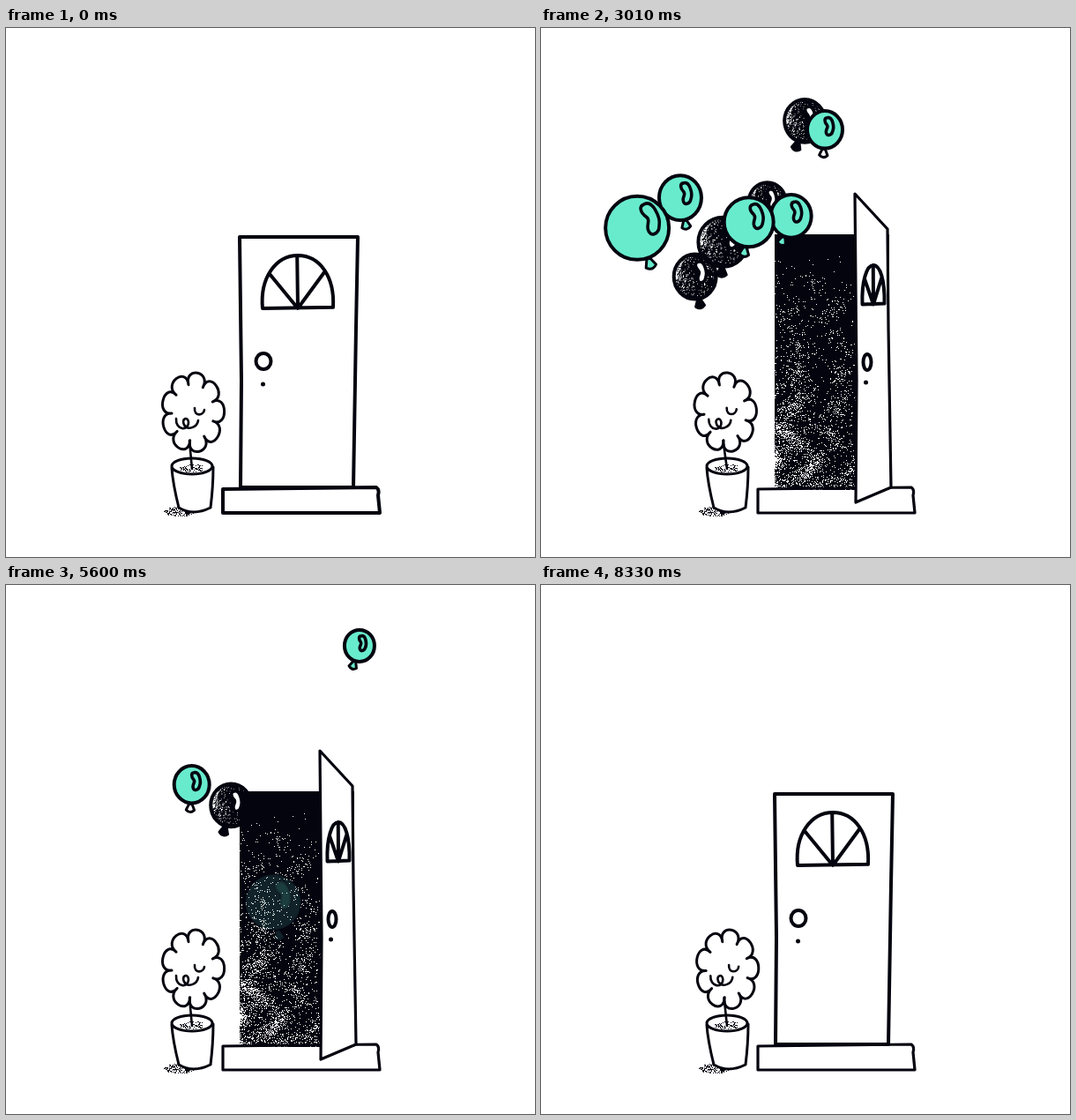
An HTML page with a canvas that plays this animation: 600 by 600 pixels, repeating every 8400 ms.

```html
<!DOCTYPE html>
<html lang="en">
<head>
<meta charset="utf-8">
<title>Balloons at the door</title>
<style>
html, body { margin: 0; height: 100%; overflow: hidden; background: #fff; }
canvas { display: block; }
</style>
</head>
<body>
<canvas id="stage" width="600" height="600"></canvas>
<script>
const LOOP = 8400, STEP = 70;
const INK = '#04040f', TEAL = '#68ebcd', WHITE = '#fff';
const c = document.getElementById('stage').getContext('2d');

let seed = 7;
const rnd = () => (seed = seed * 16807 % 2147483647) / 2147483647;
const clamp = v => Math.max(0, Math.min(1, v));
const mix = (a, b, k) => a + (b - a) * k;
const easeQuad = s => s < .5 ? 2 * s * s : 1 - 2 * (1 - s) ** 2;
const easeCos = s => (1 - Math.cos(Math.PI * clamp(s))) / 2;

// Ink surface with clumps of random pinholes; hole(u, v) is the chance of one
function speckled(w, h, hole) {
  const cv = document.createElement('canvas');
  cv.width = w;
  cv.height = h;
  const g = cv.getContext('2d');
  g.fillStyle = INK;
  g.fillRect(0, 0, w, h);
  for (let y = 0; y < h; y++) for (let x = 0; x < w; x++) {
    const clump = .5 + .5 * Math.sin(x * .13 + 2 * Math.sin(y * .07)) * Math.sin(y * .09);
    if (rnd() < hole(x / w, y / h) * (.3 + 2 * clump * clump)) g.clearRect(x, y, 1, 1);
  }
  return cv;
}
const hall = speckled(130, 290, (u, v) =>
  .05 * clamp(v * 4 - .3) + .3 * Math.exp(-u * 3.5) * clamp((v - .4) * 2.5) + .14 * clamp((v - .85) * 6));
const rubber = speckled(60, 60, (u, v) => .06 + .65 * clamp(.7 - u * 1.4));

const cloud = (n, x, y, rx, ry) => Array.from({ length: n }, () => {
  const a = rnd() * 6.283, d = Math.sqrt(rnd());
  return [x + Math.cos(a) * rx * d, y + Math.sin(a) * ry * d];
});
const shadow = cloud(190, 196, 548, 17, 5.5);
const soil = cloud(75, 211, 499, 14, 4.5);

function dots(list) {
  c.fillStyle = INK;
  for (const [x, y] of list) c.fillRect(Math.round(x), Math.round(y), 1, 1);
}

function draw(path, width, fill) {
  if (fill) {
    c.fillStyle = fill;
    c.fill(path);
  }
  c.lineWidth = width;
  c.stroke(path);
}

function ellipse(x, y, rx, ry) {
  const p = new Path2D();
  p.ellipse(x, y, rx, ry, 0, 0, 7);
  return p;
}

// Leafy crown: equal lobes around an oval
function makeCrown(lobes) {
  const at = (i, rx, ry) => {
    const a = (i / lobes) * 2 * Math.PI - 1.78;
    return `${212 + rx * Math.cos(a)} ${436 + ry * Math.sin(a)}`;
  };
  let d = 'M' + at(0, 24, 32);
  for (let i = 0; i < lobes; i++) {
    d += `C${at(i - .04, 43, 54)} ${at(i + 1.04, 43, 54)} ${at(i + 1, 24, 32)}`;
  }
  return new Path2D(d + 'Z');
}
const crown = makeCrown(9);
const twigs = new Path2D('M193 443C192 456 207 458 207 447C206 440 199 443 202 450C206 457 217 453 218 445' +
  'M214 431C213 441 224 440 225 433M208 468L211 500');
const pot = new Path2D('M188 499C189 515 193 532 196 544Q212 554 232 544Q235 520 235 498');
const base = new Path2D('M246 523L420 521Q424 524 422 530L424 550L246 550Z');
const bean = new Path2D('M-.2 -1.7C.9 -1.9 1 .3 .6 1C.3 1.9 -.8 2 -.7 1C-.6 .3 -.1 .2 -.4 -.3C-.9 -1 -.8 -1.7 -.2 -1.7Z');
const knot = new Path2D('M-2 1L-6 10Q0 16 6 10L2 1Z');

function sway(t, from, peak, to) {
  return t < peak ? easeCos((t - from) / (peak - from)) : easeCos((to - t) / (to - peak));
}

function plant(t) {
  dots(shadow);
  draw(pot, 3, WHITE);
  draw(ellipse(211, 497, 23, 9), 3, WHITE);
  dots(soil);
  c.save();
  c.translate(210, 500);
  c.rotate(-.09 * (sway(t, 840, 2100, 4000) + sway(t, 7140, 7800, 8500)));
  c.translate(-210, -500);
  draw(crown, 3, WHITE);
  draw(twigs, 2.6);
  c.restore();
}

const openness = t => easeQuad(clamp(Math.min(t - 840, 8330 - t) / 840));

function door(k) {
  const lift = k ** .7, x = mix(265, 356, k), w = mix(4, 3.2, k);
  const top = mix(237, 188, lift), bottom = mix(521, 538, lift);
  const right = mix(399, 393, k), foot = mix(394, 397, k);
  draw(new Path2D(`M${x} ${top}L${right} ${mix(237, 228, k)}L${mix(397, 394, k)} 340L${foot} 521L${x + 1} ${bottom}L${x + 2} 400Z`), w, WHITE);

  // Fan window
  const cx = mix(331, 377, k), hw = mix(40, 12.5, k), y0 = mix(258, 269, k), y1 = mix(318, 313.5, k);
  const px = u => cx + hw * u, py = v => mix(y0, y1, v);
  draw(new Path2D(`M${px(-1)} ${y1}C${px(-1.08)} ${py(.42)} ${px(-.62)} ${y0} ${cx} ${y0}` +
    `C${px(.62)} ${y0} ${px(1.05)} ${py(.4)} ${px(1)} ${py(.98)}Z` +
    `M${px(-.8)} ${py(.35)}L${cx} ${y1}L${px(.77)} ${py(.3)}M${px(-.02)} ${y0}L${cx} ${y1}`), 4);

  draw(ellipse(mix(292, 370, k), mix(378, 379, k), mix(8.5, 4.5, k), 9), 4);
  c.fillStyle = INK;
  c.fill(ellipse(mix(291.5, 368.5, k), mix(404, 402, k), 2.5, 2.5));
}

// Each balloon swings out to its leftmost point (x, y) at time `turn`, then drifts up to the right.
// Those that swing further leave the hall earlier.
const HALL_X = 305, HALL_Y = 370, EMERGE = 300;
const balloons = [];
function balloon(until, turn, x, y, r, look = {}) {
  const born = turn - 300 - 6.4 * (HALL_X - x);
  balloons.push({ until, turn, x, y, r, born, pace: 1, swing: 1, ...look });
}
const dark = { dark: true }, calm = { dark: true, pace: .75, swing: .5 };
const slow = { pace: .9 }, pale = { tip: WHITE };

const FIRST = 4410, SECOND = 8330;
balloon(FIRST, 1850, 263, 214, 23, calm);
balloon(FIRST, 3545, 141, 207, 24, dark);
balloon(FIRST, 2690, 243, 241, 21, dark);
balloon(FIRST, 2720, 195, 283, 28, dark);
balloon(FIRST, 2673, 134, 251, 24, { pace: 1.3 });
balloon(FIRST, 2690, 270, 257, 23);
balloon(FIRST, 2690, 222, 264, 28);
balloon(FIRST, 3328, 98, 188, 36, slow);
balloon(FIRST, 1750, 200, 265, 20, pale);
balloon(SECOND, 5930, 251, 217, 23, calm);
balloon(SECOND, 6890, 144, 203, 36, slow);
balloon(SECOND, 5320, 200, 265, 20, pale);
balloon(SECOND, 3820, 262, 231, 17, { pace: .78 });

function place(b, t) {
  const s = (t - b.turn) * b.pace;
  const x = b.x + b.swing * .14 * (Math.hypot(475, s) - 475);
  const height = HALL_Y - (b.y - .137 * s + 1.5e-5 * s * s);
  return [
    mix(HALL_X, x, easeQuad(clamp((t - b.born) / EMERGE))),
    HALL_Y - (height + Math.hypot(height, 30)) / 2
  ];
}

function drawBalloon(b, t) {
  const [x, y] = place(b, t);
  const fresh = clamp((t - b.born) / EMERGE);
  const fade = clamp(Math.min((y - 34) / 14, (b.until - t) / 140));
  const r = b.r * mix(.85, 1, fresh), ry = r * (r < 26 ? 1.06 : 1);
  const size = .5 + .5 * r / 36, body = ellipse(0, 0, r, ry);

  c.save();
  c.translate(x, y);
  c.globalAlpha = b.dark ? fade : fade * fresh;

  c.save();
  c.rotate((b.x - 185) * .004);
  c.translate(0, ry);
  c.scale(size, size);
  draw(knot, 3 / size, b.dark ? INK : b.tip || TEAL);
  c.restore();

  if (b.dark) {
    c.save();
    c.clip(body);
    c.globalAlpha = fade * fresh;
    c.drawImage(rubber, -r, -ry, 2 * r, 2 * ry);
    c.restore();
  }
  draw(body, 4, b.dark ? null : TEAL);

  const k = r * .29;
  c.globalAlpha = fade * fresh;
  c.translate(r * r * .012, -r * (.05 + r * .007));
  c.rotate(.2 - r * .015);
  c.scale(k, k);
  draw(bean, 3.6 / k, b.dark ? WHITE : TEAL);
  c.restore();
}

function frame() {
  const t = Math.floor(performance.now() % LOOP / STEP) * STEP;
  const k = openness(t);
  c.fillStyle = WHITE;
  c.fillRect(0, 0, 600, 600);
  c.strokeStyle = INK;
  c.lineJoin = c.lineCap = 'round';

  plant(t);
  draw(base, t < 840 ? 4 : 3.2, WHITE);
  if (k > 0) c.drawImage(hall, 265, 234);

  // The newest balloons are still behind the door leaf
  const live = balloons.filter(b => k > 0 && t > b.born && t < b.until);
  const inside = b => t - b.born < EMERGE;
  live.filter(inside).forEach(b => drawBalloon(b, t));
  door(k);
  live.filter(b => !inside(b)).forEach(b => drawBalloon(b, t));
  requestAnimationFrame(frame);
}
frame();
</script>
</body>
</html>
```
